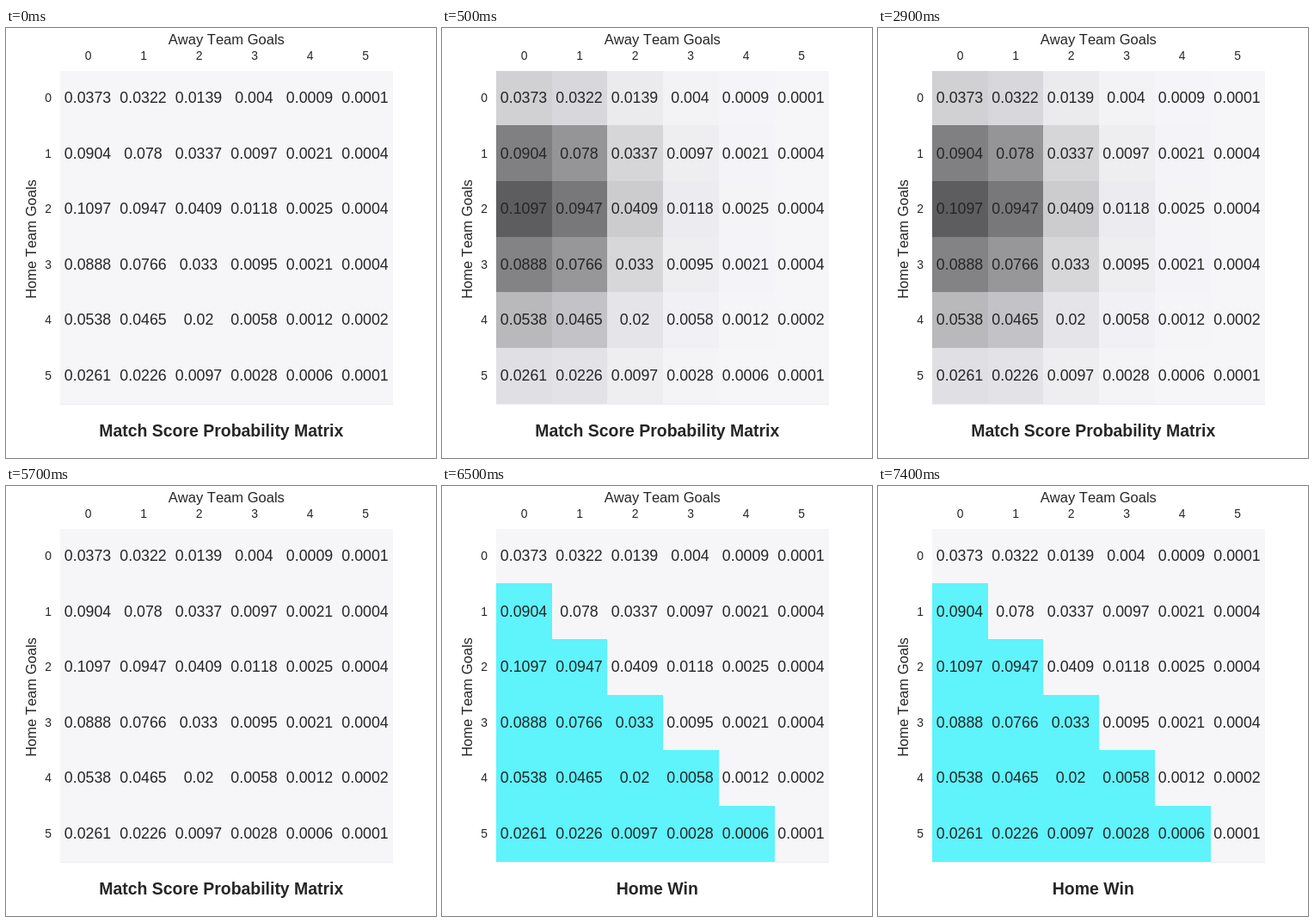
Write an HTML page that moves like this. It is 500 by 500 pixels and loops after 8 s.

```html
<!DOCTYPE html>
<html lang="en">
<head>
<meta charset="utf-8">
<title>Score matrix</title>
<style>
  html, body { margin: 0; width: 100%; height: 100%; overflow: hidden; background: #fff; }
  svg { display: block; width: 500px; height: 500px; }
  text { font-family: "Liberation Sans", Arial, sans-serif; fill: #262626; text-anchor: middle; font-kerning: none; }
</style>
</head>
<body>
<svg viewBox="0 0 500 500"></svg>
<script>
const svg = document.querySelector("svg");
const SIZE = 6, HOME_MEAN = 2.42663, AWAY_MEAN = .86295;
const PLAIN = "#f6f6f9", CYAN = "#5ff3fb";
const GREYS = [255, 217, 150, 82, 0];

// Chance of k goals when the average is mean.
const poisson = (mean, k) => k ? poisson(mean, k - 1) * mean / k : Math.exp(-mean);
const chance = (home, away) => poisson(HOME_MEAN, home) * poisson(AWAY_MEAN, away);
const highest = chance(2, 0);

// Cell borders, cropped to the plot area.
const clamp = (v, low, high) => Math.min(high, Math.max(low, Math.round(v)));
const edgeX = i => clamp(62.9 + 64.75 * i, 63, 450);
const edgeY = i => clamp(48.3 + 64.75 * i, 50, 437);

// Grey ramp laid at 60% over the pale plot background.
function shade(p) {
  const pos = p / highest * (GREYS.length - 1);
  const i = Math.min(GREYS.length - 2, Math.floor(pos));
  const grey = GREYS[i] + (GREYS[i + 1] - GREYS[i]) * (pos - i);
  const mix = back => Math.floor(grey * .6 + back * .4);
  return `rgb(${mix(234)},${mix(234)},${mix(242)})`;
}

function add(tag, attrs, content = "") {
  const el = document.createElementNS("http://www.w3.org/2000/svg", tag);
  for (const key in attrs) el.setAttribute(key, attrs[key]);
  el.textContent = content;
  return svg.appendChild(el);
}
const label = (content, x, y, size, extra) =>
  add("text", { x, y, "font-size": size, ...extra }, content);

const cells = [];
for (let row = 0; row < SIZE; row++) {
  const baseline = Math.round(87 + 64.6 * row);
  label(row, 49, baseline - 1, 13.89);
  label(row, 95.5 + 64.5 * row, 37, 13.89);
  for (let col = 0; col < SIZE; col++) {
    const x = edgeX(col), y = edgeY(row), p = chance(row, col);
    const rect = add("rect", {
      x, y, width: edgeX(col + 1) - x, height: edgeY(row + 1) - y,
      "shape-rendering": "crispEdges"
    });
    cells.push({ rect, plain: PLAIN, heat: shade(p), win: col < row ? CYAN : PLAIN });
    label(+p.toFixed(4), 95 + 64.5 * col, baseline, 17.8);
  }
}
// Neighbouring cells must not cover the numbers.
svg.prepend(...cells.map(cell => cell.rect));

add("path", { d: "M63 437.5H450", stroke: "#ececef" });
label("Away Team Goals", 256.3, 19, 16.55);
label("Home Team Goals", 0, 0, 16.55, { transform: "translate(34.5 245.5) rotate(-90)" });
const title = label("", 250.3, 475, 19.44, { "font-weight": "bold" });

function draw() {
  const t = performance.now() % 8000;
  const state = t >= 6500 ? "win" : t >= 500 && t < 4500 ? "heat" : "plain";
  for (const cell of cells) cell.rect.setAttribute("fill", cell[state]);
  title.textContent = state === "win" ? "Home Win" : "Match Score Probability Matrix";
  requestAnimationFrame(draw);
}
draw();
</script>
</body>
</html>
```
